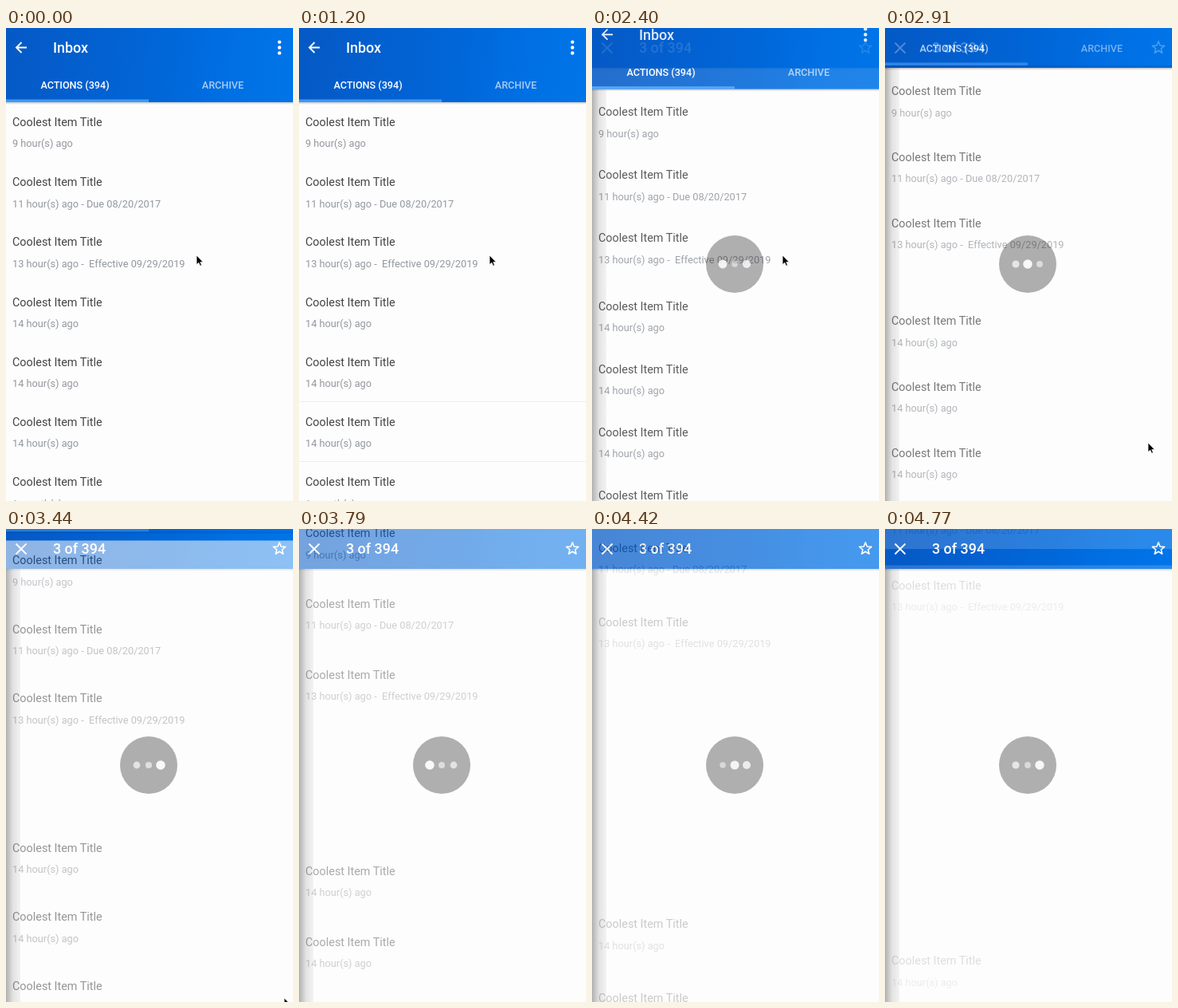
An HTML page that plays this animation: 360x593 px, repeating every 4870 ms.

```html
<!DOCTYPE html>
<html lang="en">
<head>
<meta charset="utf-8">
<title>Inbox transition</title>
<style>
  html, body { margin: 0; width: 100%; height: 100%; overflow: hidden; background: #fdfdfd; }
  svg { display: block; width: 100vw; height: 100vh; font-family: Roboto, sans-serif; }
  text { white-space: pre; }
  .heading { font-size: 17.9px; font-weight: 500; fill: #fff; }
  .tab { font-size: 12.6px; font-weight: 500; fill: #fff; text-anchor: middle; }
  .title { font-size: 14.4px; fill: #444; }
  .meta { font-size: 12.75px; fill: #92979e; }
  .icon { fill: none; stroke: #fff; stroke-width: 1.9; }
</style>
</head>
<body>
<svg viewBox="0 0 360 593">
  <defs>
    <linearGradient id="blue" gradientUnits="userSpaceOnUse" x1="0" y1="0" x2="360" y2="40">
      <stop offset="0" stop-color="#0559c5"/>
      <stop offset=".35" stop-color="#0361d1"/>
      <stop offset=".6" stop-color="#0068da"/>
      <stop offset=".8" stop-color="#0070e4"/>
      <stop offset="1" stop-color="#0074e8"/>
    </linearGradient>
    <linearGradient id="drop" x2="0" y2="1">
      <stop stop-color="#000" stop-opacity=".22"/>
      <stop offset="1" stop-color="#000" stop-opacity="0"/>
    </linearGradient>
    <linearGradient id="edgeFade">
      <stop stop-color="#000" stop-opacity=".3"/>
      <stop offset=".5" stop-color="#000" stop-opacity=".1"/>
      <stop offset="1" stop-color="#000" stop-opacity=".04"/>
    </linearGradient>
  </defs>

  <rect width="360" height="593" fill="#fdfdfd"/>
  <g id="detail">
    <rect y="50" width="360" height="3" fill="url(#drop)"/>
    <rect width="360" height="50" fill="url(#blue)"/>
    <path class="icon" d="M12.5 18.5l13 13m0-13l-13 13"/>
    <text class="heading" x="59" y="31">3 of 394</text>
    <path id="star" class="icon" stroke-linejoin="round" style="stroke-width:1.6"/>
  </g>

  <g id="list">
    <g id="rows"></g>
    <path id="dividers" d="M0 468.5H360M0 543.5H360" stroke="#eee"/>
    <g id="header">
      <rect y="93" width="360" height="3" fill="url(#drop)"/>
      <rect width="360" height="93" fill="url(#blue)"/>
      <path class="icon" d="M26 24.5H13.5M19.5 18l-6.5 6.5 6.5 6.5"/>
      <text class="heading" x="59" y="31">Inbox</text>
      <g fill="#fff">
        <circle cx="343" cy="17.6" r="2.2"/>
        <circle cx="343" cy="24.5" r="2.2"/>
        <circle cx="343" cy="31.4" r="2.2"/>
      </g>
      <text class="tab" x="86.5" y="76.3">ACTIONS (394)</text>
      <text class="tab" x="272" y="76.3" opacity=".65">ARCHIVE</text>
      <rect y="89.5" width="179" height="3.5" fill="#3f98f5"/>
    </g>
  </g>

  <rect id="edge" width="18" height="593" fill="url(#edgeFade)"/>
  <g id="loader">
    <circle cx="179" cy="296" r="36" opacity=".31"/>
    <g id="dots" fill="#fff"></g>
  </g>
  <path id="cursor" d="M0 0V11.5L2.7 9.2 4.6 13.2 6.4 12.4 4.7 8.6H8.2Z" stroke="#fff" stroke-width=".7"/>
</svg>

<script>
const LOOP = 4870, TAP = 1200, LOADING = 1460, FIRST_STEP = 1610, STEP = 87.78;
const ROW = 75.2, HEADER = 93, OPENED = 2;

const $ = id => document.getElementById(id);
const clamp = v => Math.max(0, Math.min(1, v));
const move = (el, x, y) => el.setAttribute('transform', `translate(${x} ${y})`);
const show = (el, on) => el.setAttribute('visibility', on ? 'visible' : 'hidden');

function add(parent, tag, attrs, text = '') {
  const el = document.createElementNS('http://www.w3.org/2000/svg', tag);
  for (const key in attrs) el.setAttribute(key, attrs[key]);
  el.textContent = text;
  return parent.appendChild(el);
}

const details = [
  '9 hour(s) ago', '11 hour(s) ago - Due 08/20/2017',
  '13 hour(s) ago -  Effective 09/29/2019',
  '14 hour(s) ago', '14 hour(s) ago', '14 hour(s) ago', '1 month(s) ago'
];
const rows = details.map(detail => {
  const row = add($('rows'), 'g', {});
  add(row, 'rect', { width: 360, height: ROW + 0.1, fill: '#fdfdfd' });
  add(row, 'text', { class: 'title', x: 8, y: 30 }, 'Coolest Item Title');
  add(row, 'text', { class: 'meta', x: 8, y: 56.4 }, detail);
  return row;
});
const dots = [164, 179, 194].map(cx => add($('dots'), 'circle', { cx, cy: 296 }));

const starPoints = Array.from({ length: 10 }, (_, i) => {
  const r = i % 2 ? 3.5 : 8, angle = i * Math.PI / 5;
  return `${343 + r * Math.sin(angle)} ${24.8 - r * Math.cos(angle)}`;
});
$('star').setAttribute('d', `M${starPoints.join('L')}Z`);

// Each stop: step, x, y.
const cursorPath = [[11, 239, 285], [15, 330, 520], [21, 349, 588], [22, 352, 600]];
function cursorAt(step) {
  if (step <= cursorPath[0][0]) return cursorPath[0].slice(1);
  const i = cursorPath.findIndex(p => p[0] >= step);
  if (i < 0) return [400, 640];
  const [s0, x0, y0] = cursorPath[i - 1], [s1, x1, y1] = cursorPath[i];
  const k = (step - s0) / (s1 - s0);
  return [x0 + (x1 - x0) * k, y0 + (y1 - y0) * k];
}

function draw(t) {
  const step = Math.floor((t - FIRST_STEP) / STEP + 0.2);
  const gap = Math.max(0, step - 2.9) * 0.62;
  const split = (Math.max(0, step - 3.92) * 0.4385) ** 2;

  rows.forEach((row, i) => {
    const shift = i <= OPENED
      ? -split - (OPENED - i) * gap
      : split + (i - OPENED - 1) * gap;
    move(row, 0, HEADER + i * ROW + shift);
  });
  const headerShift = -split - (OPENED + 1) * gap;
  move($('header'), 0, headerShift);
  $('list').setAttribute('opacity', 1 - clamp((step - 4) * 0.026));
  show($('dividers'), t >= TAP && t < LOADING);

  const loading = t >= LOADING;
  show($('edge'), loading);
  $('edge').setAttribute('y', Math.max(50, HEADER + headerShift));
  show($('loader'), loading);
  const peak = 2.6 + (step - 9) * 0.207;
  dots.forEach((dot, i) => {
    const wave = (1 + Math.cos((peak - i) * 2 * Math.PI / 3)) / 2;
    dot.setAttribute('r', 3.7 + 2.1 * wave);
    dot.setAttribute('opacity', 0.5 + 0.42 * wave);
  });

  move($('cursor'), ...cursorAt(step));
}

const start = performance.now();
function tick() {
  draw((performance.now() - start) % LOOP);
  requestAnimationFrame(tick);
}
tick();
</script>
</body>
</html>
```
